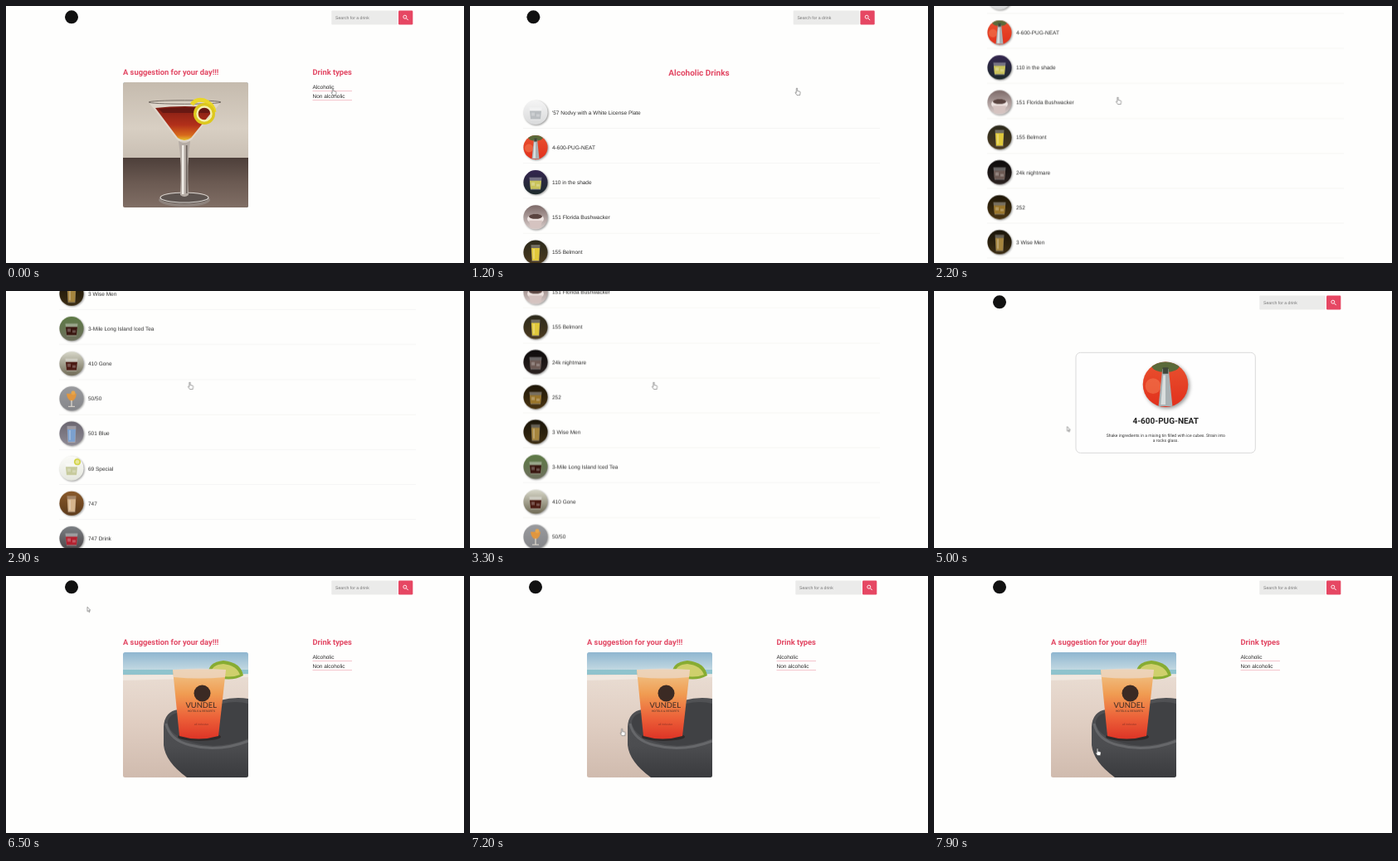
Write an HTML page that moves like this. It is 552 px wide and 310 px high and loops after 8 s.

```html
<!DOCTYPE html>
<html lang="en">
<head>
<meta charset="utf-8">
<title>Drinks</title>
<style>
html, body { margin: 0; width: 100%; height: 100%; overflow: hidden; background: #fefefd; }
svg { display: block; width: 552px; height: 310px; text-rendering: geometricPrecision; }
text { font-family: "Liberation Sans", Arial, sans-serif; fill: #2b2b2b; }
.h { font: 700 9.33px Roboto, sans-serif; fill: #e24763; }
.big { font-size: 10px; }
.dark { fill: #222; }
.row { font-size: 6.5px; }
.hint { font-size: 5.18px; fill: #777; }
.body { font: 5.05px Roboto, sans-serif; fill: #333; }
.mid { text-anchor: middle; }
.shadow { filter: drop-shadow(1px 1.2px 1.2px #0006); }

.page, .hand, .arrow { animation: 8s step-end infinite; }
.home { animation-name: home; }
.bar { animation-name: bar; }
.list { animation-name: list; }
.card { animation-name: card; }
.first { animation-name: first; }
.hand { animation-name: hand; }
.arrow { animation-name: arrow; }
.scroll { animation: scroll 8s linear infinite; }
.cursor { animation: move 8s linear infinite; }

@keyframes home { 0% { opacity: 1 } 12.5% { opacity: 0 } 76.25%, 100% { opacity: 1 } }
@keyframes bar { 0% { opacity: 1 } 15% { opacity: 0 } 52.5%, 100% { opacity: 1 } }
@keyframes list { 0% { opacity: 0 } 15% { opacity: 1 } 52.5%, 100% { opacity: 0 } }
@keyframes card { 0% { opacity: 0 } 57.5% { opacity: 1 } 76.25%, 100% { opacity: 0 } }
@keyframes first { 0% { opacity: 1 } 50%, 100% { opacity: 0 } }
@keyframes hand {
  0% { opacity: 1 } 52.5% { opacity: 0 } 73.125% { opacity: 1 }
  76.875% { opacity: 0 } 86%, 100% { opacity: 1 }
}
@keyframes arrow {
  0% { opacity: 0 } 52.5% { opacity: 1 } 73.125% { opacity: 0 }
  76.875% { opacity: 1 } 86%, 100% { opacity: 0 }
}
@keyframes scroll {
  0%, 25% { transform: translateY(0) }
  27.5% { transform: translateY(-138.2px) }
  36.25% { transform: translateY(-420.2px) }
  37.5%, 38.75% { transform: translateY(-424px) }
  45%, 100% { transform: translateY(0) }
}
@keyframes move {
  0%, 16% { transform: translate(394px, 99px); animation-timing-function: ease-in-out }
  23.5%, 44.5% { transform: translate(221.5px, 110px); animation-timing-function: ease-in-out }
  48.2%, 57.5% { transform: translate(123.5px, 159px); animation-timing-function: ease-in-out }
  61.5%, 68.5% { transform: translate(160.5px, 163.5px); animation-timing-function: ease-in-out }
  73.75%, 76.875% { transform: translate(79px, 14px); animation-timing-function: ease-in }
  81.25% { transform: translate(97.8px, 37px); animation-timing-function: ease-out }
  94%, 100% { transform: translate(197px, 208px) }
}
</style>
</head>
<body>
<svg id="stage" viewBox="0 0 552 310"></svg>
<script>
const PITCH = 42.15, FIRST_Y = 128.4;

// name, backdrop top, backdrop bottom, drink, glass
const drinks = [
  ["'57 Nodvy with a White License Plate", "#f4f4f4", "#d9dadb", "#b9bdc0", "low"],
  ["4-600-PUG-NEAT", "#e8512f", "#e2301c", "#a9b1b4", "tower"],
  ["110 in the shade", "#34264f", "#1d2a2b", "#c9c35a", "low"],
  ["151 Florida Bushwacker", "#7d6a68", "#d9cdcb", "#5a4440", "foam"],
  ["155 Belmont", "#2c2a1c", "#4b3a1f", "#e0c83a", "tall"],
  ["24k nightmare", "#0d0b0b", "#2b2220", "#6d5a54", "low"],
  ["252", "#1d1608", "#4a3410", "#9a752a", "low"],
  ["3 Wise Men", "#1a1509", "#3b2c12", "#a5843d", "tall"],
  ["3-Mile Long Island Iced Tea", "#5d7a45", "#6d6f5c", "#38160f", "low"],
  ["410 Gone", "#d8d8ca", "#6f6a55", "#4a1a12", "low"],
  ["50/50", "#9a9b9e", "#85868a", "#e0963f", "stem"],
  ["501 Blue", "#6b6670", "#8d8a94", "#7ba0cf", "tall"],
  ["69 Special", "#fbfbf8", "#e6e8df", "#c6ca9c", "lime"],
  ["747", "#8a5a2a", "#5d3a1a", "#d6b48c", "tall"],
  ["747 Drink", "#7c8084", "#4b4548", "#b3202f", "low"],
];

const path = (d, fill, extra = "") => `<path d="${d}" fill="${fill}" ${extra}/>`;
const rect = (x, y, w, h, fill, extra = "") =>
  `<rect x="${x}" y="${y}" width="${w}" height="${h}" fill="${fill}" ${extra}/>`;
const disc = (x, y, r, fill, extra = "") =>
  `<circle cx="${x}" cy="${y}" r="${r}" fill="${fill}" ${extra}/>`;
const oval = (x, y, rx, ry, fill, extra = "") =>
  `<ellipse cx="${x}" cy="${y}" rx="${rx}" ry="${ry}" fill="${fill}" ${extra}/>`;
const label = (x, y, cls, str) => `<text x="${x}" y="${y}" class="${cls}">${str}</text>`;
const page = (cls, body) => `<g class="page ${cls}">${body}</g>`;
const fade = (id, ...stops) => `<linearGradient id="${id}" x2="0" y2="1">` +
  stops.map(([at, c]) => `<stop offset="${at}" stop-color="${c}"/>`).join("") + "</linearGradient>";

// Glasses are drawn around 0,0 inside a circle of radius 14.5.
const glasses = {
  low: c => path("M-7.5-6H7.5L6 9H-6Z", "#fff", 'opacity=".35"') + path("M-7-2H7L6 8H-6Z", c) +
    path("M-5 0h4v4h-4zM1 2h4v3H1z", "#fff", 'opacity=".25"'),
  tall: c => path("M-5.5-9H5.5L4.5 11H-4.5Z", "#fff", 'opacity=".3"') + path("M-5-5H5L4 10H-4Z", c) +
    path("M-3-4h2V8h-2z", "#fff", 'opacity=".25"'),
  stem: c => path("M-6-6H6Q5 2 0 3Q-5 2-6-6Z", c) + path("M-.6 2H.6V9H4V10H-4V9H-.6Z", "#e2dcd2") +
    disc(2, -7, 2.5, "#e8a64a"),
  foam: c => oval(0, 2, 10, 6, "#eee4e1") + oval(0, -1, 8, 3, c) + path("M-8 4H8L6 13H-6Z", "#d5c3c0"),
  lime: c => glasses.low(c) + disc(7, -8, 4, "#cfd13c") + disc(7, -8, 2.5, "#e9e79a"),
  tower: c => oval(0, -12, 9, 4, "#5b6a3a") + disc(-8, 1, 5, "#f4774f", 'opacity=".6"') +
    path("M-2-10H2L4.5 14H-4.5Z", c) + path("M-1.5-6H0L0 13H-3Z", "#d9dede") +
    path("M-1.8-11H1.8V-7H-1.8Z", "#41473a"),
};

function thumb(i, x, y, scale = 1) {
  const [, , , drink, glass] = drinks[i];
  return `<g class="shadow" transform="translate(${x} ${y}) scale(${scale})">` +
    disc(0, 0, 14.6, `url(#bg${i})`) +
    `<g clip-path="url(#round)">${glasses[glass](drink)}</g></g>`;
}

const header = dx => `<g transform="translate(${dx})">` +
  disc(79, 13.3, 8, "#111") +
  rect(392.3, 5.5, 79.5, 17, "#ebebea", 'rx="1"') +
  label(397, 16, "hint", "Search for a drink") +
  rect(473, 5.5, 17.3, 17, "#e64763", 'rx="1.2"') +
  `<path d="M482.5 14.8l2.2 2.3" stroke="#fff" stroke-width="1"/>` +
  disc(480.8, 13.2, 2, "none", 'stroke="#fff" stroke-width=".9"') + "</g>";

const photo = body => `<g clip-path="url(#photo)">${body}</g>`;

const martini = photo(
  rect(141, 92, 151, 92, "url(#wall)") + rect(141, 183, 151, 60, "url(#table)") +
  oval(215, 234, 31, 8, "#8d827c") + oval(215, 232, 29, 6.5, "#5d5450") +
  oval(215, 231, 29, 6, "none", 'stroke="#d9d4cf" stroke-width="1.2"') +
  path("M208 163H222Q218 190 220 228Q215 232 210 228Q212 190 208 163Z", "#b5aca5") +
  path("M212 168h2.5v59h-2.5z", "#f0ece6") + path("M217 168h1.5v58h-1.5z", "#6a605b") +
  path("M172 116H259L224 161Q215 169 206 161Z", "#e9e2d8", 'opacity=".6"') +
  path("M180 123Q215 119 252 123L223 159Q215 165 207 159Z", "url(#cocktail)") +
  path("M184 124Q215 121 249 124L244 129H189Z", "#571512", 'opacity=".7"') +
  oval(215.5, 116, 43.5, 2.2, "none", 'stroke="#756c65" stroke-width="1"') +
  path("M224 119Q229 111 239 114Q250 118 251 128", "none", 'stroke="#e9d629" stroke-width="5"') +
  disc(239, 130, 10.5, "none", 'stroke="#ddc81e" stroke-width="5"') +
  disc(239, 130, 8.5, "none", 'stroke="#f4efac" stroke-width="2.4"'));

const beach = photo(
  rect(141, 92, 151, 24, "url(#sky)") + rect(141, 113, 151, 8, "#8fc3cd") +
  rect(141, 119, 151, 124, "url(#sand)") +
  path("M141 120L292 118V122L141 126Z", "#f3ebe4", 'opacity=".8"') +
  path("M190 182Q191 163 208 161L258 150Q276 145 292 148V243H218Q192 224 190 204Z", "url(#barrel)") +
  path("M195 178Q195 166 211 164L260 154Q278 150 292 154V196Q256 211 222 200Q198 192 195 178Z", "#404144") +
  path("M193 178Q197 198 222 204Q256 213 292 199", "none", 'stroke="#66676a" stroke-width="3"') +
  oval(233, 194, 26, 5, "#2f2b2b") +
  path("M244 118Q243 104 262 102Q283 104 286 120Q268 130 244 118Z", "#87ac32") +
  path("M247 117Q248 107 262 106Q278 108 282 119Q267 125 247 117Z", "#cfd06c") +
  path("M201 113H265L256 193Q232 200 209 193Z", "url(#cup)") +
  path("M201 113Q233 110 265 113L264 122Q233 125 202 122Z", "#ecd9c8", 'opacity=".75"') +
  disc(236.5, 141.5, 10, "#3b2a24") +
  '<text x="235.3" y="159.3" class="mid" font-size="9.3" style="font-family:Lato,sans-serif;fill:#3b2a24">VUNDEL</text>' +
  '<text x="235.5" y="164" class="mid" font-size="3.3" style="fill:#3b2a24">HOTELS &amp; RESORTS</text>' +
  '<text x="235.5" y="179.5" class="mid" font-size="3.4" style="fill:#8c3426">all inclusive</text>');

const home = label(141, 83.2, "h", "A suggestion for your day!!!") +
  label(369.5, 83.2, "h", "Drink types") +
  label(369.5, 100.3, "row", "Alcoholic") + rect(369.5, 102.1, 47.5, .7, "#efabb7") +
  label(369.5, 111.2, "row", "Non alcoholic") + rect(369.5, 113.1, 47.5, .7, "#efabb7") +
  beach + page("first", martini);

const rows = drinks.map(([name], i) => {
  const y = FIRST_Y + i * PITCH;
  return thumb(i, 79, y) + label(99, y + 2.4, "row", name) + rect(64, y + 19, 430, .5, "#ededeb");
}).join("");

const card = rect(171, 74.3, 216.3, 121, "#fefefe", 'rx="5.5" stroke="#d9d9d9" stroke-width="1"') +
  thumb(1, 279, 112.8, 1.87) +
  label(279.2, 160, "h big dark mid", drinks[1][0]) +
  label(279.3, 175.7, "body mid", "Shake ingredients in a mixing tin filled with ice cubes. Strain into") +
  label(279.3, 182, "body mid", "a rocks glass.");

const cursor = `<g class="cursor" stroke="#444" stroke-width=".5" stroke-linejoin="round">` +
  path("M-.7.8Q-.7 0 0 0T.7.8V3.6L3.3 4.1Q4.2 4.3 4.1 5.3L3.6 8.6H0L-1.8 5.9Q-2.2 5.1-1.4 5L-.7 5.6Z", "#fff", 'class="hand"') +
  path("M0 0V5.5L1.3 4.4L2.1 6.4L3 6L2.2 4.1H3.8Z", "#fff", 'class="arrow"') + "</g>";

const defs = "<defs>" +
  drinks.map(([, a, b], i) => fade("bg" + i, [0, a], [1, b])).join("") +
  fade("wall", [0, "#c5bbae"], [.6, "#d8cfc3"], [1, "#c9bfb3"]) +
  fade("table", [0, "#4d3f3a"], [.5, "#6b5a52"], [1, "#806e65"]) +
  fade("cocktail", [0, "#7d1c14"], [.55, "#b2301a"], [.85, "#d86a1c"], [1, "#e6c02c"]) +
  fade("sky", [0, "#8fb6d0"], [1, "#c9dde4"]) +
  fade("sand", [0, "#e9dcd2"], [.5, "#dfcdc1"], [1, "#d0bbae"]) +
  fade("barrel", [0, "#505154"], [.6, "#4c4d50"], [1, "#3a3b3e"]) +
  fade("cup", [0, "#f0c68a"], [.35, "#f09c52"], [.7, "#ec6038"], [1, "#dd3426"]) +
  `<clipPath id="round">${disc(0, 0, 14.6, "#000")}</clipPath>` +
  `<clipPath id="photo">${rect(141, 92, 151, 151, "#000", 'rx="2.5"')}</clipPath></defs>`;

document.getElementById("stage").innerHTML = defs +
  page("bar", header(0)) + page("home", home) + page("card", card) +
  page("list", `<g class="scroll">${header(-2.6)}${label(276, 84.4, "h big mid", "Alcoholic Drinks")}${rows}</g>`) +
  cursor;
</script>
</body>
</html>
```
